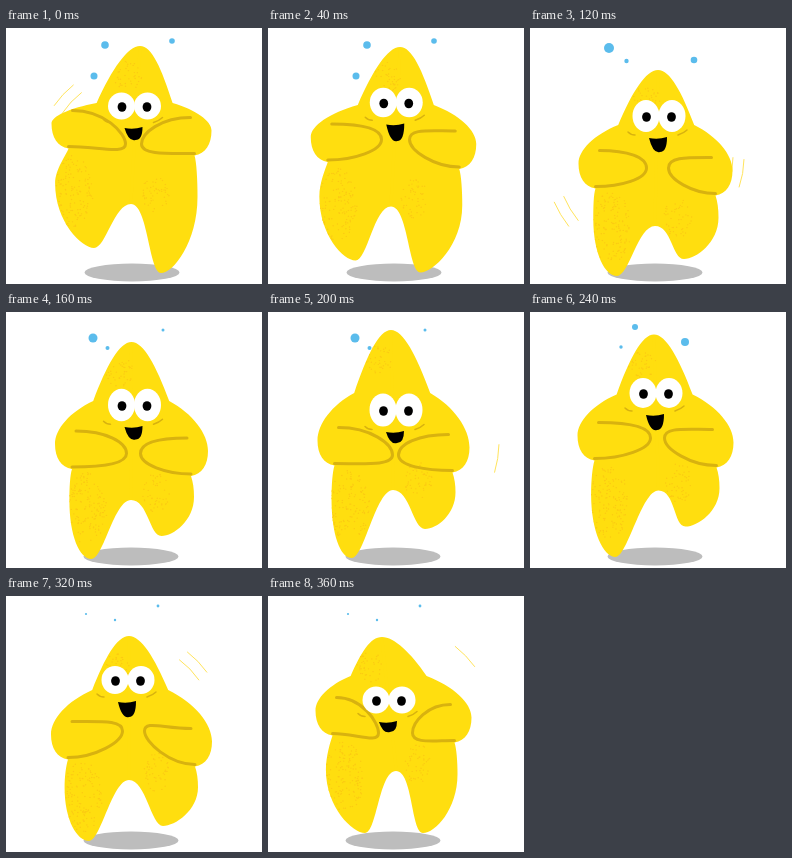
These frames come from a looping animation (256 by 256 pixels, 0.4 s). An HTML page with a canvas:

```html
<!DOCTYPE html>
<html lang="en">
<head>
<meta charset="utf-8">
<title>Dancing star</title>
<style>
html, body { margin: 0; width: 100%; height: 100%; overflow: hidden; background: #fff; }
canvas { display: block; width: 256px; height: 256px; }
</style>
</head>
<body>
<canvas id="stage"></canvas>
<script>
const STEP = 40, COUNT = 10;
const BODY = '#ffde0f', CREASE = '#d8b20f', SPECK = '#fbcb12', SWISH = '#ffe45c';
const canvas = document.getElementById('stage');
const ctx = canvas.getContext('2d');
const ratio = window.devicePixelRatio || 1;
canvas.width = canvas.height = 256 * ratio;
ctx.scale(ratio, ratio);
ctx.lineCap = ctx.lineJoin = 'round';

// Key poses by step. arms: [half spread, height], hands: [half gap, height],
// eyes: [middle x, y, height], mouth: depth.
const keys = {
  0: { tip: [134, 18], neck: [75], arms: [80, 99], hands: [8, 116], left: [88, 220],
    right: [155, 245], crotch: [125, 176], eyes: [128.5, 78, 13.5], mouth: [13] },
  2: { tip: [130, 20], neck: [79], arms: [85.5, 126], hands: [20, 107], left: [87, 245],
    right: [150, 244], crotch: [121, 181], eyes: [128, 71, 16], mouth: [22] },
  3: { tip: [128, 42], neck: [97], arms: [77, 139], hands: [11, 140], left: [87, 248],
    right: [154, 231], crotch: [125, 198], eyes: [129, 88, 16], mouth: [15] },
  5: { tip: [123, 18], neck: [81], arms: [76, 132], hands: [3, 143], left: [84, 246],
    right: [157, 217], crotch: [125, 178], eyes: [128, 98, 16.5], mouth: [12] },
  7: { tip: [125, 27], neck: [84], arms: [80, 122], hands: [11, 109], left: [87, 244],
    right: [154, 212], crotch: [132, 179], eyes: [124, 64, 13.5], mouth: [20] },
  8: { tip: [123, 40], neck: [94], arms: [80.5, 142], hands: [11, 135], left: [83, 245],
    right: [157, 230], crotch: [123, 184], eyes: [122, 84, 14], mouth: [16] },
  9: { tip: [114, 41], neck: [80], arms: [78, 118], hands: [17, 137], left: [97, 237],
    right: [155, 237], crotch: [128, 175], eyes: [121, 104, 13.5], mouth: [11] }
};

// Water drops hold for two steps: x, y, radius.
const drops = [
  [[99, 17, 3.8], [166, 13, 2.8], [88, 48, 3.5]],
  [[79, 20, 5], [96.5, 33, 2.2], [164, 32, 3.3]],
  [[87, 26, 4.5], [101.5, 36, 2], [157, 18, 1.5]],
  [[105, 15, 3], [91, 35, 1.7], [155, 30, 4]],
  [[80, 18, 1.1], [109, 24, 1.2], [152, 10, 1.4]]
];

// Swish arcs around the body: step, angle in degrees, radius, strokes.
const swishes = [
  [0, -137, 82, 2], [2, -140, 108, 1], [2, 154, 89, 2], [3, 149, 99, 2],
  [3, 10, 78, 2], [5, 9, 106, 1], [7, -42, 74, 2], [8, -44, 82, 2], [9, -44, 101, 1]
];

const mix = (a, b, t) => a + (b - a) * t;

// Steps without a key sit halfway between their neighbours.
function poseAt(step) {
  if (keys[step]) return keys[step];
  const a = keys[step - 1], b = keys[step + 1], pose = {};
  for (const part in a) pose[part] = a[part].map((v, i) => mix(v, b[part][i], 0.5));
  return pose;
}

// Joints of one side; s is -1 for left and 1 for right.
function joints(p, s) {
  const neck = [125 + s * 38 + (p.tip[0] - 125) * 0.4, p.neck[0]];
  const elbow = [125.5 + s * p.arms[0], p.arms[1] + s * 3.5];
  const pit = [elbow[0] - s * 17, elbow[1] + 25];
  const foot = s < 0 ? p.left : p.right;
  const bulge = s < 0 ? 3 + (246 - foot[1]) * 0.4 : 3;
  const hip = [pit[0] + s * bulge, mix(pit[1], foot[1], 0.35)];
  const hand = [127.5 + s * p.hands[0], p.hands[1]];
  return { neck, elbow, pit, foot, hip, hand };
}

// Half of the outline, from the tip down to the crotch.
function addHalf(path, p, s) {
  const [tx, ty] = p.tip, [cx, cy] = p.crotch;
  const { neck: [nx, ny], elbow: [ex, ey], pit: [px, py], foot: [fx, fy], hip: [hx, hy] } = joints(p, s);
  path.moveTo(tx, ty);
  path.bezierCurveTo(tx + s * 12, ty, mix(nx, tx, 0.4) + s * 2, mix(ny, ty, 0.6), nx, ny);
  path.bezierCurveTo(mix(nx, ex, 0.6), mix(ny, ey, 0.25), ex, mix(ey, ny, 0.35), ex, ey);
  path.bezierCurveTo(ex, ey + 14, ex - s * 6, py - 2, px, py);
  path.bezierCurveTo(px + s * 2, py + 6, hx, mix(hy, py, 0.4), hx, hy);
  path.bezierCurveTo(hx, mix(hy, fy, 0.6), fx + s * 12, fy, fx, fy);
  path.bezierCurveTo(fx - s * 12, fy, cx + s * 17, cy, cx, cy);
  path.closePath();
}

// Folded forearm: out to the hand and back to the armpit.
function forearm(p, s) {
  const { elbow: [ex, ey], pit: [px, py], hand: [hx, hy] } = joints(p, s);
  const sx = ex - s * 21, sy = ey - 13, ny = py - 2;
  return new Path2D(`M${sx} ${sy}C${mix(sx, hx, 0.6)} ${sy} ${hx} ${hy - 11} ${hx} ${hy}` +
    `C${hx} ${hy + 11} ${mix(px, hx, 0.5)} ${ny} ${px} ${ny}`);
}

function oval(x, y, rx, ry, color) {
  ctx.fillStyle = color;
  ctx.beginPath();
  ctx.ellipse(x, y, rx, ry, 0, 0, Math.PI * 2);
  ctx.fill();
}

function line(path, color, width) {
  ctx.strokeStyle = color;
  ctx.lineWidth = width;
  ctx.stroke(path);
}

function random(seed) {
  return () => (seed = (seed * 16807) % 2147483647) / 2147483647;
}

function speckle(p, outline, step) {
  const rnd = random(step * 911 + 77);
  const patch = (x, y, rx, ry, count) => {
    for (let i = 0; i < count; i++) {
      const a = rnd() * Math.PI * 2, r = Math.sqrt(rnd());
      oval(x + Math.cos(a) * r * rx, y + Math.sin(a) * r * ry, 0.8, 0.7, SPECK);
    }
  };
  const [hx, hy] = joints(p, -1).hip;
  ctx.save();
  ctx.clip(outline);
  patch(hx + 18, hy + 8, 20, 36, 140);
  patch(p.right[0] - 6, p.crotch[1] - 8, 14, 20, 50);
  patch(p.tip[0] - 12, p.tip[1] + 30, 14, 15, 40);
  ctx.restore();
}

function drawFace(p) {
  const [x, y, h] = p.eyes, depth = p.mouth[0];
  line(new Path2D(`M${x + 19} ${y + h + 3}q6 -2 9 -5M${x - 31} ${y + h}q3 3 7 3`), CREASE, 1.5);
  for (const s of [-1, 1]) oval(x + s * 13, y, 13.5, h, '#fff');
  for (const s of [-1, 1]) oval(x + s * 12.5, y + 1, 4.4, 4.8, '#000');
  ctx.fillStyle = '#000';
  ctx.fill(new Path2D(`M${x - 10} ${y + 22}q9 2 18 -1` +
    `q0 ${depth} -7 ${depth}q-7 2 -11 ${1 - depth}Z`));
}

function drawSwish([, angle, radius, strokes]) {
  const mid = angle * Math.PI / 180;
  for (let i = 0; i < strokes; i++) {
    const r = radius + i * 11, half = 14 / r, path = new Path2D();
    path.arc(125, 130, r, mid - half, mid + half);
    line(path, SWISH, 1);
  }
}

function draw(step) {
  const p = poseAt(step), outline = new Path2D();
  addHalf(outline, p, -1);
  addHalf(outline, p, 1);
  ctx.fillStyle = '#fff';
  ctx.fillRect(0, 0, 256, 256);
  oval(step < 2 ? 126 : 125, 244.5, 47.5, 9, '#bdbdbd');
  swishes.filter(w => w[0] === step).forEach(drawSwish);
  for (const [x, y, r] of drops[step >> 1]) oval(x, y, r, r, '#5bbcec');
  ctx.fillStyle = BODY;
  ctx.fill(outline);
  // Cover the seam between the halves.
  line(new Path2D(`M${p.tip[0]} ${p.tip[1] + 3}L${p.crotch[0]} ${p.crotch[1] - 3}`), BODY, 3);
  speckle(p, outline, step);
  for (const s of [-1, 1]) line(forearm(p, s), CREASE, 3);
  drawFace(p);
}

let shown = -1;
function tick() {
  const step = Math.floor(performance.now() / STEP) % COUNT;
  if (step !== shown) draw(shown = step);
  requestAnimationFrame(tick);
}
tick();
</script>
</body>
</html>
```
